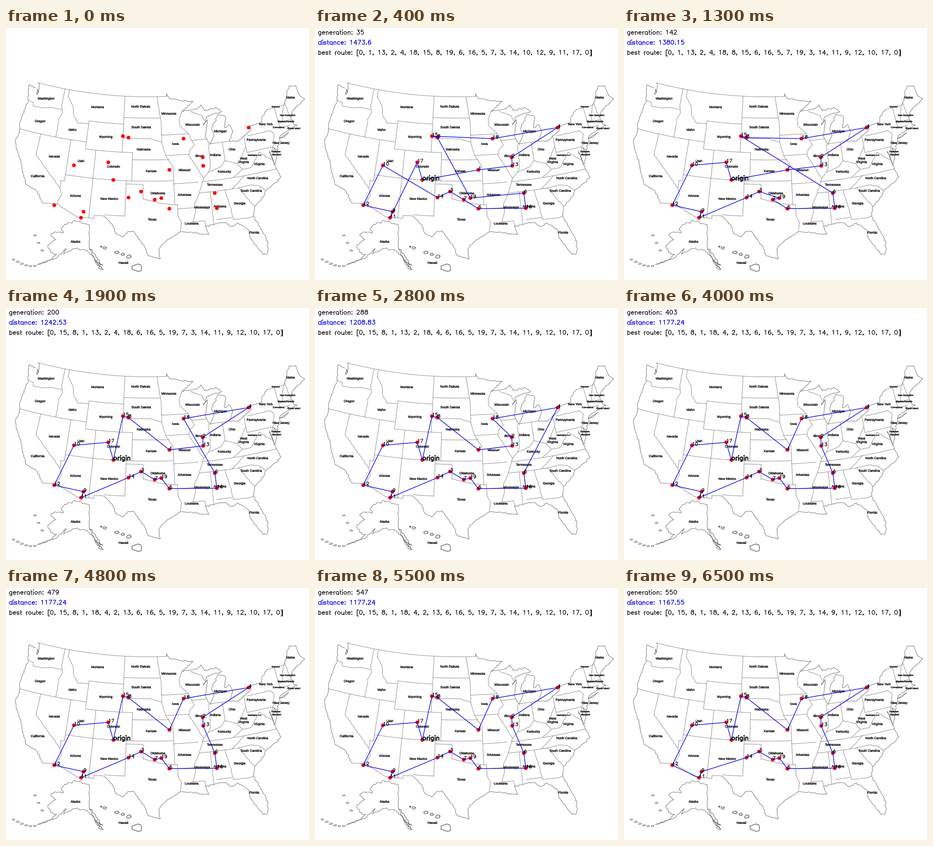
A matplotlib script for the animation above (6700 ms loop, 600x500 px).

```python
import numpy as np
import matplotlib.pyplot as plt
from matplotlib.animation import FuncAnimation
from matplotlib.collections import LineCollection
from matplotlib.patheffects import withStroke

W, H, DPI = 600, 500, 100
PX = 72 / DPI
BLUE = (0, 0, 0.9)
rng = np.random.default_rng(4)

plt.rcParams["font.family"] = "Liberation Sans"
fig = plt.figure(figsize=(W / DPI, H / DPI), dpi=DPI, facecolor="white")
ax = fig.add_axes([0, 0, 1, 1])
ax.set(xlim=(-0.5, W - 0.5), ylim=(H - 0.5, -0.5))
ax.axis("off")


# ---- map: Albers conic, points are (degrees west, degrees north) -----
def conic(pts, scale=797, west0=99, lat0=37, origin=(282, 303.5)):
    s1, s2 = np.sin(np.radians([29.5, 45.5]))
    n = (s1 + s2) / 2
    west, lat = np.radians(np.array(pts, float)).T

    def radius(a):
        return np.sqrt(1 - s1 ** 2 + 2 * n * (s1 - np.sin(a))) / n

    turn, rho = n * (np.radians(west0) - west), radius(lat)
    drop = rho * np.cos(turn) - radius(np.radians(lat0))
    return np.column_stack([rho * np.sin(turn), drop]) * scale + origin


def rough(pts, amp):
    """Break each side into short steps with a little sideways noise."""
    out = [pts[0]]
    for a, b in zip(pts[:-1], pts[1:]):
        d = b - a
        length = np.hypot(*d) + 1e-9
        n = max(1, int(length / 3))
        wob = rng.normal(0, amp, n)
        wob[-1] = 0
        side = np.array([-d[1], d[0]]) / length
        out += [a + d * (k + 1) / n + w * side for k, w in enumerate(wob)]
    return np.array(out)


def trace(pts, color="#8a8a8a", width=0.9):
    ax.plot(*np.transpose(pts), color=color, lw=width * PX,
            solid_joinstyle="round", zorder=1)


def coast(*pts, amp=0.7):
    trace(rough(conic(pts), amp), "#707070")


def river(*pts):
    trace(rough(conic(pts), 0.35))


def parallel(lat, *spans):
    for west, east in spans:
        trace(conic([(w, lat) for w in np.linspace(west, east, 20)]))


def meridian(west, north, south):
    trace(conic([(west, north), (west, south)]))


def island(x, y, rx, ry, color):
    a = np.linspace(0, 2 * np.pi, 10)
    r = 1 + rng.uniform(-0.25, 0.25, a.size)
    r[-1] = r[0]
    trace(np.column_stack([x + rx * r * np.cos(a), y + ry * r * np.sin(a)]), color)


# straight state lines
parallel(49, (123, 95.15))
parallel(45.94, (104.05, 96.55))
parallel(46, (119, 116.95))
parallel(45, (111.05, 104.05), (74.8, 71.4))
parallel(43.5, (96.45, 91.2))
parallel(43, (104.05, 98.5))
parallel(42.74, (73.3, 70.9))
parallel(42.5, (90.6, 87.8))
parallel(42, (124.2, 111.05), (79.8, 75.35), (73.5, 71.4))
parallel(41.75, (87.2, 83.4))
parallel(41, (111.05, 102.05))
parallel(40.6, (95.8, 91.4))
parallel(40, (102.05, 95.2))
parallel(39.72, (80.52, 75.75))
parallel(37, (114.05, 94.6))
parallel(36.55, (103.03, 100), (94.6, 90.2), (89.4, 75.9))
parallel(35, (90.1, 83.1))
parallel(33, (94.04, 91.1))
parallel(32, (106.5, 103.05))
parallel(31, (91.6, 89.7), (87.6, 85))
for line in ((120, 42, 39), (117.03, 49, 46.4), (117.03, 44.3, 42), (116.05, 49, 48),
             (114.05, 42, 36.1), (111.05, 45, 41), (109.05, 41, 31.33),
             (104.05, 49, 41), (103.03, 37, 32), (102.05, 41, 37), (100, 36.5, 34.5),
             (94.5, 39.1, 33.6), (94.04, 33.6, 32), (88.2, 35, 30.4), (87.53, 41.7, 39.3),
             (84.8, 41.7, 39.1), (80.52, 42, 39.72), (75.7, 39.72, 38.45),
             (73.35, 45, 42), (71.8, 42, 41.35)):
    meridian(*line)

# crooked state lines
river((124, 46.2), (122.9, 46.1), (122.7, 45.6), (121, 45.65), (119, 46))
river((117.03, 46.4), (116.6, 45.6), (117.2, 44.4))
river((116.05, 48), (114.7, 46.7), (114.3, 45.5), (113.2, 44.5), (111.05, 44.6))
river((120, 39), (114.63, 35), (114.2, 34.2), (114.7, 32.7))
river((114.05, 36.1), (114.7, 36.1), (114.63, 35))
river((97.2, 49), (96.8, 47), (96.45, 45.3), (96.45, 42.5))
river((98.5, 43), (96.45, 42.5), (95.8, 40.6), (94.6, 39.1))
river((100, 34.5), (98, 34.1), (96.5, 33.8), (94.04, 33.55))
river((94.04, 32), (93.5, 31), (93.8, 29.7))
river((92.1, 46.75), (92.8, 45.6), (92.75, 44.7), (91.2, 43.5), (90.2, 41.8),
      (91.1, 41.2), (91.4, 40.4), (90.2, 38.8), (89.1, 37), (90.1, 35),
      (91.1, 33.5), (91, 32.5), (91.6, 31))
river((89.1, 37), (88.1, 37.8), (85.8, 38.3), (84.8, 39.1), (82.6, 38.4),
      (81.8, 39.1), (80.52, 40.6))
river((87.53, 39.3), (87.6, 38.5), (88.1, 37.8))
river((90.4, 46.6), (88.1, 45.9), (87.7, 45.1))
river((82.6, 38.4), (82, 37.5), (83.7, 36.6))
river((82, 37.5), (80.3, 37.5), (78.3, 39.4), (77, 38.4), (76.3, 38))
river((81.7, 36.6), (83.1, 35.7), (84.3, 35))
river((83.1, 35), (81, 35.1), (79.7, 34.8), (78.6, 33.9))
river((83.1, 35), (82.2, 33.6), (81, 32))
river((85.6, 35), (85.1, 32.5), (84.85, 30.7), (82.2, 30.55), (81.5, 30.7))
river((75.35, 42), (74.7, 41.4), (75.2, 40.6), (74.8, 40.2), (75.6, 39.7))
river((71.4, 45), (72.3, 43.6), (72.5, 42.74))
river((71.1, 45.3), (70.95, 43.4), (70.7, 43.05))
river((89.7, 31), (89.6, 30.2))

# Pacific, Mexico and the Gulf
coast((122.8, 49), (122.4, 48.2), (122.5, 47.3), (122.8, 48.1), (122.4, 47.6), amp=1.3)
coast((123.2, 48.2), (124.7, 48.4), (124, 46.2), (124.5, 42.8), (124.2, 42),
      (124.1, 41), (124.4, 40.4), (123.7, 39), (122.5, 37.8), (121.9, 36.6),
      (120.6, 34.6), (118.5, 34), (117.1, 32.5))
river((117.1, 32.5), (114.7, 32.7), (111.07, 31.33), (108.2, 31.33), (108.2, 31.8),
      (106.5, 31.8))
coast((106.5, 31.8), (104.9, 30.6), (104.4, 29.5), (103.2, 29), (102.4, 29.8),
      (101.4, 29.8), (99.5, 27.5), (99.1, 26.4), (97.2, 25.9), (97.4, 27.3),
      (96.4, 28.4), (93.8, 29.7), (91.3, 29.4), (89.2, 29), (89.6, 30.2),
      (88, 30.4), (86.2, 30.4), (85.3, 29.7), (84.2, 30.1), (82.8, 29),
      (82.7, 27.8), (81.8, 26.2), (81.1, 25), (80.4, 25.1), (80, 26.8), (81.5, 30.7))
# Atlantic
coast((81.5, 30.7), (81, 32), (79.3, 33.1), (78.6, 33.9), (76.5, 34.7), (75.5, 35.3),
      (75.9, 36.5), (76.4, 39.2), (75.95, 37.2), (75.1, 38.6), (75.5, 39.6),
      (74.9, 39), (74, 40.6), (73.6, 41), (71.3, 41.5), (70, 41.7), (70.6, 42),
      (70.8, 42.9), (70.1, 43.8), (67, 44.9), (67.8, 45.7), (67.8, 47.1),
      (69.1, 47.4), (70, 46.7), (70.3, 45.9), (71.4, 45))
coast((74, 40.6), (72, 41.05), (73, 40.65), (74, 40.6), amp=0.3)
# Great Lakes
coast((95.15, 49), (95.15, 49.4), (94.6, 48.7), (92, 48.3), (89.6, 48), (92.1, 46.75),
      (89, 46.9), (88, 47.4), (87.5, 46.5), (85, 46.75), (84, 46), (87, 45.7),
      (88, 44.5), (87.1, 45.2), (87.9, 43), (87.2, 41.65), (86.2, 42.8),
      (86.5, 43.8), (84.8, 45.75), (83.4, 45.2), (83.9, 43.7), (82.9, 44.05),
      (82.45, 43), (83.4, 41.75), (81.7, 41.5), (78.9, 42.8), (79.05, 43.27),
      (76.5, 43.5), (76.3, 44.1), (74.8, 45))

# Alaska and Hawaii insets, in pixels
ALASKA = [(164, 390), (136, 381), (122, 386), (109, 397), (113, 406), (97, 404),
          (88, 411), (98, 419), (82, 432), (88, 445), (100, 449), (88, 459), (62, 469),
          (97, 457), (119, 437), (113, 448), (135, 437), (160, 441), (192, 479),
          (177, 465), (165, 435), (164, 390)]
trace(rough(np.array(ALASKA, float), 0.9), "#707070")
trace(rough(np.array([(165, 435), (191, 470), (176, 459), (188, 480)], float), 1.3), "#555555")
for x in np.linspace(14, 56, 6):
    island(x, 459 + 13 * np.sin(np.pi * (x - 14) / 75), 2.6, 1.5, "#666666")
for k in range(3):
    island(57 + 7 * k, 411 + 15 * k, 2.6, 1.5, "#666666")
for x, r in zip((188, 195, 219, 231, 243), (1.5, 3.5, 4, 3, 4.5)):
    island(x, 434 + 0.36 * (x - 190), r, 0.7 * r, "#222222")
island(259, 475, 9, 8, "#222222")


def names(size, **places):
    for name, (x, y) in places.items():
        ax.text(x, y, name.replace("_", " "), size=size * PX, color="#222222",
                ha="center", va="center", zorder=2,
                path_effects=[withStroke(linewidth=0.25, foreground="#222222")])


names(6.4, Washington=(79, 140), Oregon=(67, 185), Idaho=(131, 202), Montana=(181, 157),
      Wyoming=(197, 216), Nevada=(95, 255), Utah=(148, 264), California=(62, 294),
      Colorado=(212, 275), Arizona=(137, 333), New_Mexico=(204, 339), Texas=(289, 380),
      North_Dakota=(266, 156), South_Dakota=(267, 197), Nebraska=(272, 241),
      Kansas=(287, 284), Oklahoma=(300, 328), Minnesota=(322, 170), Iowa=(335, 230),
      Missouri=(353, 282), Arkansas=(353, 331), Louisiana=(367, 388), Wisconsin=(369, 192),
      Illinois=(383, 254), Michigan=(424, 205), Indiana=(414, 252), Ohio=(447, 241))
names(6.4, Kentucky=(432, 285), Tennessee=(413, 311), Mississippi=(388, 356),
      Alabama=(423, 354), Georgia=(462, 348), Florida=(491, 406), South_Carolina=(485, 323),
      North_Carolina=(498, 298), Virginia=(501, 270), West=(470, 259),
      Pennsylvania=(495, 222), New_York=(514, 191), New_Jersey=(544, 228),
      Maine=(563, 138), Alaska=(137, 424), Hawaii=(232, 466))
names(6.4, Virginia=(470, 266))
names(4.9, Massachusetts=(554, 185))
names(4.3, Vermont=(533, 156), New_Hampshire=(557, 173), Connecticut=(539, 197),
      Rhode_Island=(569, 199), Delaware=(534, 245), Maryland=(535, 251))
names(3.6, **{"Washington, D.C.": (492, 252)})


# ---- plotter lettering: baseline 0, capitals 21 units high -----------
def arc(cx, cy, rx, ry, a0=0, a1=360):
    t = np.radians(np.linspace(a0, a1, 17))
    return list(zip(cx + rx * np.cos(t), cy + ry * np.sin(t)))


def bowl(a0, a1):
    return arc(9.5, 7, 6.5, 7, a0, a1)


def dot(x, y):
    return arc(x, y, 1, 1)


def stem(x, top, low=0):
    return [(x, top), (x, low)]


def turned(strokes, cx, cy):
    return [[(2 * cx - x, 2 * cy - y) for x, y in s] for s in strokes]


FIVE = arc(10, 7, 7, 7, 125, -140)
SIX = [arc(10.5, 6.5, 6.5, 6.5), arc(11.5, 9, 7.5, 12, 55, 190)]
OPEN = [[(11, 25), (4, 25), (4, -7), (11, -7)], stem(5, 25, -7)]
HOOK = [stem(4, 14), stem(4, 10, 9) + arc(9.5, 9, 5.5, 5, 150, 0) + [(15, 0)]]
GLYPHS = {
    " ": (16, []),
    "0": (20, [arc(10, 10.5, 7, 10.5)]),
    "1": (20, [[(6, 17), (8, 18), (11, 21), (11, 0)]]),
    "2": (20, [arc(10, 15.5, 6, 5.5, 175, -25) + [(13, 10), (3, 0), (17, 0)]]),
    "3": (20, [[(5, 21), (16, 21), (10, 13)] + arc(10, 6.5, 7, 6.5, 85, -155)]),
    "4": (20, [[(13, 21), (3, 7), (18, 7)], stem(13, 21)]),
    "5": (20, [[(15, 21), (5, 21), (4, 12)] + FIVE]),
    "6": (20, SIX),
    "7": (20, [[(3, 21), (17, 21), (7, 0)]]),
    "8": (20, [arc(10, 17, 6, 4), arc(10, 6.5, 7, 6.5)]),
    "9": (20, turned(SIX, 10, 10.5)),
    "a": (19, [bowl(35, 325), stem(15, 14)]),
    "b": (19, [bowl(145, -145), stem(4, 21)]),
    "c": (18, [bowl(35, 325)]),
    "d": (19, [bowl(35, 325), stem(15, 21)]),
    "e": (18, [[(3, 8), (15, 8)] + bowl(15, 325)]),
    "g": (19, [bowl(35, 325), stem(15, 14, -2) + arc(9.5, -2, 5.5, 5, 0, -130)]),
    "i": (8, [dot(4, 21), stem(4, 14)]),
    "n": (19, HOOK),
    "o": (19, [bowl(0, 360)]),
    "r": (13, [stem(4, 14), arc(11, 8, 7, 6, 180, 82)]),
    "s": (17, [arc(8.5, 10.5, 5.5, 3.5, 15, 250) + arc(8.5, 3.5, 5.5, 3.5, 70, -170)]),
    "t": (12, [stem(5, 21, 4) + arc(9, 4, 4, 4, 180, 285), [(2, 14), (9, 14)]]),
    "u": (19, turned(HOOK, 9.5, 7)),
    ":": (10, [dot(5, 13), dot(5, 1)]),
    ".": (10, [dot(5, 1)]),
    ",": (10, [dot(5, 1) + [(6, -1), (4, -4)]]),
    "[": (14, OPEN),
    "]": (14, turned(OPEN, 7, 9)),
}


def letters(text, x, y, scale=0.4):
    segs = []
    for ch in text:
        width, strokes = GLYPHS[ch]
        segs += [np.array(s) * (scale, -scale) + (x, y) for s in strokes]
        x += width * scale
    return segs


def pen(color, width):
    lines = LineCollection([], colors=[color], linewidths=width * PX,
                           capstyle="round", zorder=6)
    return ax.add_collection(lines)


# ---- cities and routes -----------------------------------------------
CITIES = np.array([(212, 301), (323, 281), (389, 256), (267, 324), (480, 197),
                   (323, 358), (413, 327), (294, 340), (242, 217), (153, 364),
                   (134, 272), (148, 376), (95, 351), (390, 273), (242, 336),
                   (231, 214), (417, 357), (202, 266), (351, 219), (307, 337)])

EAST = [1, 13, 2, 4, 18]
SOUTH = [6, 16, 5]
OLD_WEST = [3, 14, 10, 12, 9, 11, 17]
WEST = [3, 14, 11, 9, 12, 10, 17]
LAST_WEST = [3, 14, 9, 11, 12, 10, 17]
# first step on which each better route shows
ROUTES = {
    2: EAST + [8, 15, 6, 19, 16, 5, 7] + OLD_WEST,
    4: EAST + [15, 8, 19] + SOUTH + [7] + OLD_WEST,
    6: EAST + [15, 8, 19] + SOUTH + [7] + WEST,
    10: EAST + [15, 8] + SOUTH + [7, 19] + WEST,
    12: EAST + [8, 15] + SOUTH + [7, 19] + WEST,
    15: EAST + [8, 15] + SOUTH + [19, 7] + WEST,
    18: [15, 8] + EAST + SOUTH + [19, 7] + WEST,
    20: [15, 8, 1, 13, 2, 18, 4] + SOUTH + [19, 7] + WEST,
    33: [15, 8, 1, 18, 2, 4, 13] + SOUTH + [19, 7] + WEST,
    38: [15, 8, 1, 18, 4, 2, 13] + SOUTH + [19, 7] + WEST,
    56: [15, 8, 1, 18, 4, 2, 13] + SOUTH + [19, 7] + LAST_WEST,
}

ax.plot(*(CITIES - 0.5).T, "o", color="red", ms=7.4 * PX, mew=0, zorder=4)
path, = ax.plot([], [], color=BLUE, lw=1.25 * PX, zorder=5)
black, blue = pen("black", 1.15), pen(BLUE, 1.25)
tags, home = pen("black", 1.1), pen("black", 1.8)

TAGS = [s for i, (x, y) in enumerate(CITIES) if i
        for s in letters(str(i), x, y, 0.3)]
HOME = letters("origin", *CITIES[0])


def draw(i):
    shown = i >= min(ROUTES)
    tags.set_segments(TAGS if shown else [])
    home.set_segments(HOME if shown else [])
    if not shown:
        path.set_data([], [])
        black.set_segments([])
        blue.set_segments([])
        return
    route = [0] + ROUTES[max(k for k in ROUTES if k <= i)] + [0]
    pts = CITIES[route]
    path.set_data(*pts.T)
    length = np.hypot(*np.diff(pts, axis=0).T).sum()
    gen = int(np.interp(i, [2, 4, 13, 28, 40, 55, 57], [11, 35, 142, 288, 403, 547, 550]))
    black.set_segments(letters(f"generation: {gen}", 5, 12)
                       + letters(f"best route: {route}", 5, 52))
    blue.set_segments(letters(f"distance: {round(float(length), 2)}", 5, 32))


anim = FuncAnimation(fig, draw, frames=67, interval=100, init_func=lambda: None,
                     repeat=True, repeat_delay=0, blit=False)
plt.show()
```
